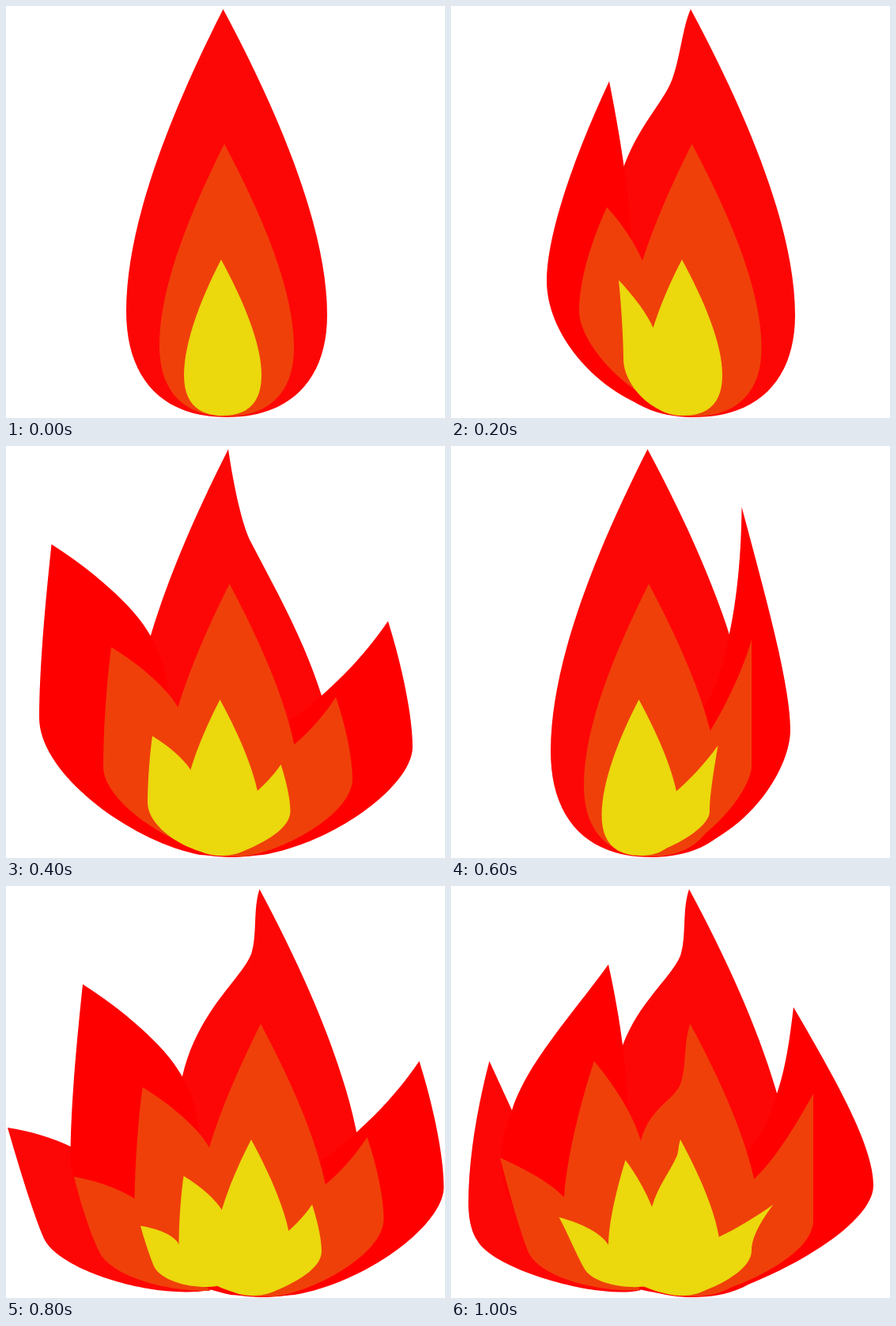
Recreate the animation shown at these times as an HTML page. Size 555 by 520 pixels, loop 1.2 s.

```html
<!DOCTYPE html>
<html lang="en">
<head>
<meta charset="utf-8">
<title>Flame</title>
<style>
  html, body { margin: 0; width: 100%; height: 100%; overflow: hidden; background: #fff; }
  svg { display: block; width: 555px; height: 520px; }
  .core { fill: #fd0706; }
  .red { fill: #f00; }
  .orange { fill: #ef400a; }
  .yellow { fill: #ebd80d; }
  .pose {
    visibility: hidden;
    animation: show 1200ms step-end infinite;
    animation-delay: calc((var(--i) - 6) * 200ms);
  }
  @keyframes show {
    0% { visibility: visible; }
    16.6667%, 100% { visibility: hidden; }
  }
</style>
</head>
<body>
<svg viewBox="0 0 555 520">
  <defs>
    <!-- plain drops -->
    <path id="big" d="M274.5 4C203 145 152 280 152 385C152 470 197 519 279 519C361 519 406 470 406 390C406 285 350 145 274.5 4Z"/>
    <path id="mid" d="M276 174C232 262 194 355 194 428C194 488 226 518 279 518C332 518 364 488 364 432C364 360 326 268 276 174Z"/>
    <path id="small" d="M272 320C246 370 225 425 225 466C225 501 243 517 274 517C305 517 323 501 323 466C323 425 299 370 272 320Z"/>

    <!-- wide fire, shared by two poses -->
    <g id="wideRed">
      <path d="M57.5 124C50 195 42 280 42 343C42 414 158 499 245 516L286 519L205 315C203 290 198 265 183 240C161 200 106 155 57.5 124Z"/>
      <path d="M483 221C455 262 425 292 399 315C385 327 370 340 360 345L286 519L325 516C418 500 514 427 514 380C514 345 503 285 483 221Z"/>
    </g>
    <g id="wideOrange">
      <use href="#mid" x="6.5"/>
      <path d="M133 254C126 310 123 365 123 405C123 446 200 503 275 518L286 518L218 331C204 305 165 273 133 254Z"/>
      <path d="M417 317C400 343 381 363 364 377L286 518L300 518C350 512 438 465 438 420C438 395 430 355 417 317Z"/>
    </g>
    <g id="wideYellow">
      <use href="#small" x="-1.5"/>
      <path d="M185 366C181 395 179 430 179 450C179 480 225 513 272 517L233.5 409C224 394 205 378 185 366Z"/>
      <path d="M347.5 402C339 415 327 427 317 436L272 517L293 514C312 507 359.5 487 359.5 461C359.5 447 355 425 347.5 402Z"/>
    </g>
  </defs>

  <g class="pose" style="--i:0">
    <use class="core" href="#big"/>
    <use class="orange" href="#mid"/>
    <use class="yellow" href="#small"/>
  </g>

  <g class="pose" style="--i:1">
    <path class="core" d="M303 4C293 25 289 70 279 94C268 122 238 150 219 201C198 260 180.5 330 180.5 385C180.5 470 225 519 307 519C390 519 435 470 435 390C435 285 378.5 145 303 4Z"/>
    <path class="red" d="M200 95C160 180 121 285 121 347C121 424 205 515 307 519L235 400L228 300C226 235 212 155 200 95Z"/>
    <g class="orange">
      <use href="#mid" x="28.5"/>
      <path d="M197 254C174 305 162 350 162 385C162 428 230 503 307 518L242 322C233 300 215 273 197 254Z"/>
    </g>
    <g class="yellow">
      <use href="#small" x="20"/>
      <path d="M212 346C215 375 218 420 218 446C218 475 250 515 292 517L256 407C248 388 230 365 212 346Z"/>
    </g>
  </g>

  <g class="pose" style="--i:2">
    <path class="core" d="M281 4C209.5 145 158.5 280 158.5 385C158.5 470 203.5 519 285.5 519C367.5 519 412.5 470 412.5 390C412.5 370 408 345 399 315C375 240 340 180 310 122C298 100 287 45 281 4Z"/>
    <use class="red" href="#wideRed"/>
    <use class="orange" href="#wideOrange"/>
    <use class="yellow" href="#wideYellow"/>
  </g>

  <g class="pose" style="--i:3">
    <use class="core" href="#big" x="-26"/>
    <path class="red" d="M367.5 77C367 140 361 195 352 237C345 275 335 305 322 325L253 519C360 515 429 415 429 358C429 300 395 180 367.5 77Z"/>
    <g class="orange">
      <use href="#mid" x="-26"/>
      <path d="M380 244C370 280 348 327 328 359L253 518L262 518C310 515 380 440 380 403Z"/>
    </g>
    <g class="yellow">
      <use href="#small" x="-34.5"/>
      <path d="M337.5 378C322 400 300 423 284.5 436L240 517L250 515C275 510 327 483 327 461C327 440 333 405 337.5 378Z"/>
    </g>
  </g>

  <g class="pose" style="--i:4">
    <g class="core">
      <path d="M2 305C18 360 35 415 48 445C68 487 195 524 262 509L120 380L82 329C60 318 30 309 2 305Z"/>
      <path d="M320.5 4C312 30 318 62 310 86C297 118 242 158 223 240C208 300 198 345 198 385C198 470 243 519 325 519C407 519 452 470 452 390C452 285 396 145 320.5 4Z"/>
    </g>
    <use class="red" href="#wideRed" x="39.5"/>
    <g class="orange">
      <use href="#wideOrange" x="39.5"/>
      <path d="M86 367C95 403 107 440 118 462C133 492 200 512 258 511L163 395C145 383 115 372 86 367Z"/>
    </g>
    <g class="yellow">
      <use href="#wideYellow" x="39.5"/>
      <path d="M170 429C175 447 181 465 187 480C198 501 240 509 267 505L219 453C213 440 190 432 170 429Z"/>
    </g>
  </g>

  <g class="pose" style="--i:5">
    <g class="core">
      <path d="M48.5 221C33 280 22 345 22 400C22 425 28 440 33 447C52 484 188 523 240 510L77 283Z"/>
      <path d="M301 4C292 30 298 65 290 88C277 118 238 145 217 201C195 260 179 330 179 385C179 470 224 519 306 519C388 519 433 470 433 390C433 285 377 145 301 4Z"/>
    </g>
    <g class="red">
      <path d="M199 99C155 160 95 225 77 283C70 300 63 325 63 343C63 430 150 495 240 509.5C262 514 280 518 306 519L223 290C224 265 221 235 217 201C213 170 207 135 199 99Z"/>
      <path d="M433 153C428 195 423 230 412 262C403 295 390 320 375 335L306 519L335 516C396 502 534 432 534 378C534 330 490 250 433 153Z"/>
    </g>
    <g class="orange">
      <path d="M302.5 174C294 195 298 230 290 250C283 270 250 280 240 322L221 428C221 488 253 518 306 518C359 518 391 488 391 432C391 360 353 268 302.5 174Z"/>
      <path d="M181 221C163 275 146 345 143 393L160 450C200 500 260 515 306 518L240 322C230 287 205 250 181 221Z"/>
      <path d="M62 343C73 385 87 435 97 460C110 495 190 513 238 510L240 400L143 393C125 374 95 358 62 343Z"/>
      <path d="M458 262C432 310 405 350 383 370L306 518L310 518C350 514 458 470 458 422Z"/>
    </g>
    <g class="yellow">
      <path d="M290 320C287 328 288 336 285 342C277 360 262 378 254 405L243 466C243 501 261 517 292 517C323 517 341 501 341 466C341 425 317 370 290 320Z"/>
      <path d="M220.5 346C210 380 199 425 199 453C199 485 245 515 292 517L254 405C246 385 233 362 220.5 346Z"/>
      <path d="M136.5 418C147 437 159 466 168 482C179 503 225 509 247 505L199 453C189 437 165 426 136.5 418Z"/>
      <path d="M407.5 402C385 418 360 433 338.5 443L292 517L310 514C335 507 380 485 380 460C380 445 390 425 407.5 402Z"/>
    </g>
  </g>
</svg>
</body>
</html>
```
